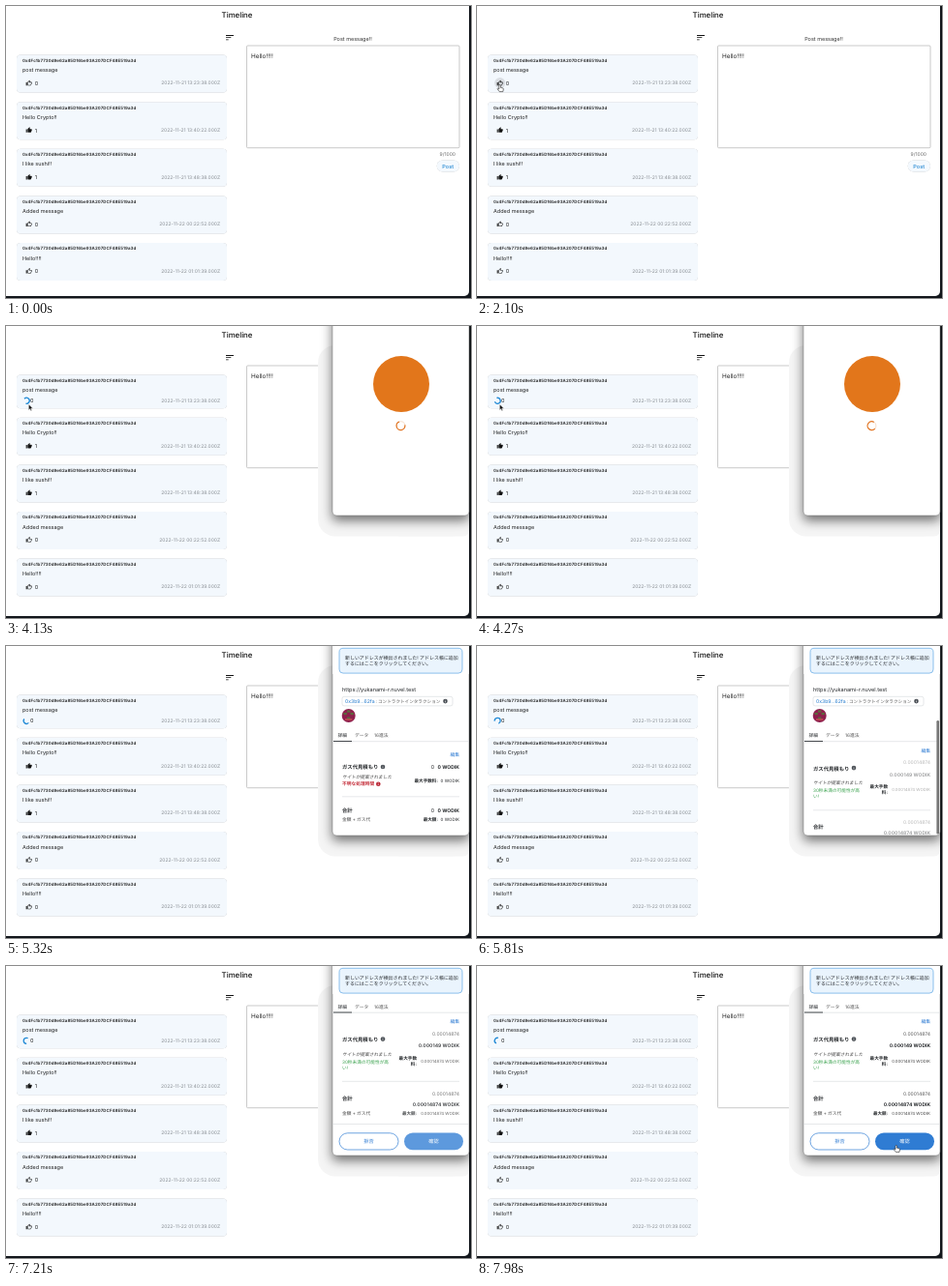
An HTML page for the animation above (8 s loop, 480x302 px).

```html
<!DOCTYPE html>
<html lang="en">
<head>
<meta charset="utf-8">
<title>Timeline</title>
<style>
  html, body { margin: 0; width: 100%; height: 100%; overflow: hidden; background: #12161b; }
  svg { display: block; width: 100vw; height: 100vh; }
  text { font-family: Inter, "Noto Sans CJK JP", "Noto Sans CJK", sans-serif; text-rendering: geometricPrecision; white-space: pre; }
  .card { filter: drop-shadow(0 .6px .6px rgba(0,0,0,.28)); }
  .window { filter: drop-shadow(0 5px 6px rgba(0,0,0,.55)); }
</style>
</head>
<body>
<svg id="stage" viewBox="0 0 480 302" preserveAspectRatio="none"></svg>
<script>
const LOOP = 8000, STEP = 70;
const HOVER = 2030, PRESS = 2240, LOAD = 2380, POPUP = 3990, LEAVE = 4480,
      DETAILS = 4830, GAS = 5600, CONFIRM_HOVER = 7490;
const SCROLL = 50.5, BLUE = '#2f7cd3', INK = '#24272a', TOKEN = 'WODIK';
const ADDRESS = '0x4Fc1b7730d9e62a85D16be93A207DCF48E519a3d';

// y is the vertical middle of the line
const text = (x, y, str, size, fill = INK, more = '') =>
  `<text x="${x}" y="${y + size * .365}" font-size="${size}" fill="${fill}" ${more}>${str}</text>`;
const BOLD = 'font-weight="700"', END = 'text-anchor="end"', MID = 'text-anchor="middle"';
const rect = (x, y, w, h, r, fill, more = '') =>
  `<rect x="${x}" y="${y}" width="${w}" height="${h}" rx="${r}" fill="${fill}" ${more}/>`;
const line = (x1, x2, y, color, w = .6) =>
  `<path d="M${x1} ${y}H${x2}" stroke="${color}" stroke-width="${w}"/>`;
const info = (x, y, color = '#4a4f55') =>
  `<circle cx="${x}" cy="${y}" r="2.3" fill="${color}"/>` +
  `<path d="M${x} ${y - 1.3}v.6m0 .5v1.5" stroke="#fff" stroke-width=".6"/>`;
const group = (id, body, more = '') => `<g id="${id}" ${more}>${body}</g>`;

const HAND_BODY = 'M9 21h9c.83 0 1.54-.5 1.84-1.22l3.02-7.05c.09-.23.14-.47.14-.73v-2c0-1.1-.9-2-2-2h-6.31l.95-4.57.03-.32c0-.41-.17-.79-.44-1.06L14.17 1 7.58 7.59C7.22 7.95 7 8.45 7 9v10c0 1.1.9 2 2 2z';
const thumb = (y, liked) =>
  `<path transform="translate(20.4 ${y - 3.2}) scale(.275)" fill="#111" d="${HAND_BODY}${liked ? '' : 'M9 9l4.34-4.34L12 10h9v2l-3 7H9V9z'}M1 9h4v12H1z" fill-rule="evenodd"/>`;

const posts = [
  ['post message', 0, '2022-11-21 13:23:38.000Z'],
  ['Hello Crypto!!', 1, '2022-11-21 13:40:22.000Z'],
  ['I like sushi!!', 1, '2022-11-21 13:48:38.000Z'],
  ['Added message', 0, '2022-11-22 00:22:52.000Z'],
  ['Hello!!!!', 0, '2022-11-22 01:01:39.000Z']
];

function card([message, likes, date], i) {
  const y = 50.6 + i * 48.6, row = y + 29;
  return group('card' + i,
    rect(11, y, 217, 39, 4, '#f3f8fd', `class="card" id="box${i}"`) +
    text(17, y + 5.7, ADDRESS, 4.4, '#1c1c1c', 'font-weight="600" letter-spacing=".1"') +
    text(17, y + 15.6, message, 5.5, '#222') +
    group('like' + i, thumb(row, likes) + text(29.8, row + .3, likes, 5.5, '#222')) +
    group('date' + i, text(221, row, date, 4.95, '#868b90', END)));
}

const page = rect(-6, -10, 484, 310, 5, '#fff') + rect(-6, -10, 12, 310, 0, '#fff', 'height="300"') +
  text(238.5, 9, 'Timeline', 7.8, '#111', MID + ' font-weight="500"') +
  '<path transform="translate(225.7 27.4) scale(.44)" fill="#111" d="M3 18h6v-2H3v2zM3 6v2h18V6H3zm0 7h12v-2H3v2z"/>' +
  posts.map(card).join('') +
  '<circle id="hover" cx="23.7" cy="79.6" r="5.6"/>' +
  '<circle id="spinner" cx="21.2" cy="77.3" r="3" pathLength="360" fill="none" stroke="#2089d5" stroke-width="1.3"/>' +
  group('wait', text(25.1, 77.4, '0', 5.5, '#222')) +
  text(358, 33.5, 'Post message!!', 5.5, '#333', MID) +
  rect(248.5, 41, 219.5, 105.7, 1, '#fff', 'stroke="#b4b4b4" stroke-width=".7"') +
  text(253, 51.5, 'Hello!!!!', 6.4, '#222') +
  text(464, 153, '9/1000', 5, '#666', END) +
  rect(444.7, 159.6, 23.3, 12, 6, '#f4f9fe', 'class="card"') +
  text(456.2, 165.6, 'Post', 5.5, '#2487d2', MID + ' font-weight="500"');

const waiting =
  '<circle cx="408" cy="60" r="29" fill="#e2761b"/>' +
  '<circle cx="407.5" cy="103.2" r="4.4" fill="none" stroke="#f6dfcc" stroke-width="1.1"/>' +
  '<circle id="ring" cx="407.5" cy="103.2" r="4.4" pathLength="360" stroke-dasharray="260 100" fill="none" stroke="#e27625" stroke-width="1.2"/>';

const identicon = '<circle cx="353.7" cy="72" r="7" fill="#8f1f4d"/>' +
  [[348.5, 69], [355.5, 69], [352, 66.5], [352, 73.5]].map(([x, y]) => rect(x, y, 3.4, 2.2, 0, '#5d6a3c')).join('') +
  rect(350, 75.2, 7.4, 1.6, 0, '#c04a52');

const header =
  text(347, 45, 'https://yukanami-r.nuvel.test', 5.6) +
  rect(347, 52.3, 114, 9.6, 2, '#fff', 'stroke="#d3d7db" stroke-width=".6"') +
  text(350, 57.1, '0x3b9...62fa', 5.1, '#1f78cc') +
  text(381.6, 57.1, ':', 4.6) + text(384, 57.1, 'コントラクトインタラクション', 4.6, '#555') +
  info(453.5, 57.1) + identicon +
  text(342.5, 92.5, '詳細', 4.8) + text(360, 92.5, 'データ', 4.8, '#555') + text(380, 92.5, '16進法', 4.8, '#555') +
  line(337, 478, 98.7, '#d6d9dc') + line(338, 357, 98.5, '#33373b', .9);

const edit = y => text(468, y, '編集', 4.8, BLUE, END);
const zero = '0 ' + TOKEN;
const emptyGas = edit(112) +
  text(347, 125, 'ガス代見積もり', 5.35, INK, BOLD) + info(389, 125) +
  text(442, 125, '0', 5.3, INK, END) + text(468, 125, zero, 5.1, INK, BOLD + END.padStart(20)) +
  text(347, 135, 'サイトが提案されました', 4.65, '#444', 'font-style="italic"') +
  text(446, 139, '最大手数料:', 4.6, INK, BOLD + ' ' + END) + text(468, 139, zero, 4.5, INK, END) +
  text(347, 142.7, '不明な処理時間', 4.75, '#c5303c', BOLD) + info(384.3, 142.7, '#b92534') +
  line(347, 468, 155.8, '#d6d9dc') +
  text(347, 170, '合計', 5.35, INK, BOLD) +
  text(442, 170, '0', 5.3, INK, END) + text(468, 170, zero, 5.1, INK, BOLD + ' ' + END) +
  text(347, 179.6, '金額 + ガス代', 4.7, '#444') +
  text(446, 179.6, '最大額:', 4.6, INK, BOLD + ' ' + END) + text(468, 179.6, zero, 4.5, INK, END);

const fee = '0.00014874';
const amounts =
  text(468, 70, fee, 5, '#555', END) +
  text(468, 82.5, '0.000149 ' + TOKEN, 5, INK, BOLD + ' ' + END) +
  text(468, 98, fee + ' ' + TOKEN, 4.3, '#444', END) +
  text(468, 132, fee, 5, '#555', END) +
  text(468, 142.7, fee + ' ' + TOKEN, 5, INK, BOLD + ' ' + END) +
  text(468, 152.7, fee + ' ' + TOKEN, 4.3, '#444', END) +
  text(424, 152.7, '最大額:', 4.5, INK, BOLD + ' ' + END);
const fullGas = edit(57.5) +
  text(347, 76.5, 'ガス代見積もり', 5.35, INK, BOLD) + info(389, 75.6) +
  text(347, 91, 'サイトが提案されました', 4.65, '#444', 'font-style="italic"') +
  text(347, 99, '30秒未満の可能性が高', 4.7, '#37a04b') + text(347, 105.2, 'い!', 4.7, '#37a04b') +
  text(424, 95, '最大手数', 4.6, INK, BOLD + ' ' + END) + text(424, 101.2, '料:', 4.6, INK, BOLD + ' ' + END) +
  line(347, 468, 119.3, '#d6d9dc') +
  text(347, 137, '合計', 5.35, INK, BOLD) +
  text(347, 152.7, '金額 + ガス代', 4.7, '#444') +
  group('amounts', amounts) +
  line(337, 478, 163.5, '#d6d9dc') +
  rect(344, 172.8, 61, 17.2, 8.6, '#fff', `stroke="${BLUE}" stroke-width=".7"`) +
  text(374.5, 181.2, '拒否', 5.2, BLUE, MID) +
  rect(411, 172.5, 61, 17.8, 8.9, '#fff') +
  group('confirm', rect(411, 172.5, 61, 17.8, 8.9, BLUE)) +
  text(441.5, 181.2, '確認', 5.2, '#fff', MID);

const banner = rect(337, -5, 141, 34, 0, '#fff') +
  rect(344, 2.3, 127, 25.8, 4, '#eaf4fd', 'stroke="#6fb0e8" stroke-width=".8"') +
  text(350, 11.7, '新しいアドレスが検出されました! アドレス帳に追加', 4.96) +
  text(350, 18.3, 'するにはここをクリックしてください。', 4.96);

const popup =
  rect(322, 20, 156, 197.5, 18, '#f5f5f5') + rect(400, 20, 78, 197.5, 6, '#f5f5f5') +
  rect(337, -20, 141, 216, 4, '#fff', 'class="window" stroke="#777" stroke-width=".5"') +
  '<g clip-path="url(#frame)">' + group('waiting', waiting) +
  group('details', group('scroller', group('header', header) + group('empty', emptyGas) +
    group('full', fullGas, `transform="translate(0 ${SCROLL})"`)) + banner) +
  rect(474.4, 77, 2.6, 117.5, 1.3, '#777', 'id="bar"') + '</g>';

const arrow = '<path d="M0 0v6l1.4-1.3.9 2 .9-.4-.9-2H4.3z" fill="#111" stroke="#fff" stroke-width=".4"/>';
const hand = '<path d="M0 0c.5 0 .8.4.8.8v2l2 .4c.7.1 1 .6.9 1.2L3.2 7H-.4L-2.4 4.4c-.4-.6.3-1 .8-.6l.8.6V.8C-.8.4-.5 0 0 0z" fill="#fff" stroke="#222" stroke-width=".6"/>';

document.getElementById('stage').innerHTML =
  '<defs><clipPath id="frame">' + rect(337, -20, 141, 216, 4, '#fff') + '</clipPath></defs>' +
  page + group('popup', popup) + group('arrow', arrow) + group('hand', hand);

const $ = id => document.getElementById(id);
const set = (id, name, value) => $(id).setAttribute(name, value);
const show = (id, on) => set(id, 'visibility', on ? 'inherit' : 'hidden');
const move = (id, x, y) => set(id, 'transform', `translate(${x} ${y})`);
const ramp = (t, a, b) => Math.min(1, Math.max(0, (t - a) / (b - a)));

// cubic-bezier(.4, 0, .2, 1)
function ease(x) {
  let lo = 0, hi = 1, s = .5;
  for (let i = 0; i < 18; i++) {
    s = (lo + hi) / 2;
    const bx = 1.2 * s * (1 - s) ** 2 + .6 * s * s * (1 - s) + s ** 3;
    if (bx < x) lo = s; else hi = s;
  }
  return s * s * (3 - 2 * s);
}

function spin(t) {
  const p = t / 1333 % 1;
  const head = 270 * ease(ramp(p, 0, .5)), tail = 270 * ease(ramp(p, .5, 1));
  const start = -90 + tail + t / 2222 * 360 + p * 90;
  set('spinner', 'transform', `rotate(${start} 21.2 77.3)`);
  set('spinner', 'stroke-dasharray', `${Math.max(head - tail, 12)} 360`);
}

function draw(t) {
  const loading = t >= LOAD;
  for (let i = 1; i < 5; i++) move('card' + i, 0, loading ? -4.4 : 0);
  set('box0', 'height', loading ? 34.6 : 39);
  move('date0', 0, loading ? -2.1 : 0);
  show('like0', !loading);
  show('spinner', loading);
  show('wait', loading);
  if (loading) spin(t - LOAD);

  show('hover', t >= HOVER && !loading);
  set('hover', 'fill', `rgba(0,0,0,${t >= PRESS ? .18 : .1})`);

  show('popup', t >= POPUP);
  show('waiting', t < DETAILS);
  set('ring', 'transform', `rotate(${(t - POPUP) * .36 - 60} 407.5 103.2)`);
  show('details', t >= DETAILS);
  show('empty', t < GAS);
  show('full', t >= GAS);
  move('scroller', 0, -SCROLL * ease(ramp(t, 5810, 6230)));
  show('bar', t >= 5810);
  set('bar', 'opacity', 1 - ramp(t, 6650, 6900));
  const ready = ramp(t, 6900, 7350);
  set('amounts', 'opacity', .42 + .58 * ready);
  set('confirm', 'opacity', .28 + .72 * ready);

  const overConfirm = t >= CONFIRM_HOVER;
  show('arrow', loading && t < LEAVE);
  move('arrow', 23.4, 81);
  show('hand', t >= HOVER && !loading || overConfirm);
  move('hand', overConfirm ? 432.8 : 23.6, overConfirm ? 185.4 : 81.6);
}

function tick() {
  const t = performance.now() % LOOP;
  draw(Math.floor(t / STEP) * STEP);
  requestAnimationFrame(tick);
}
tick();
</script>
</body>
</html>
```
